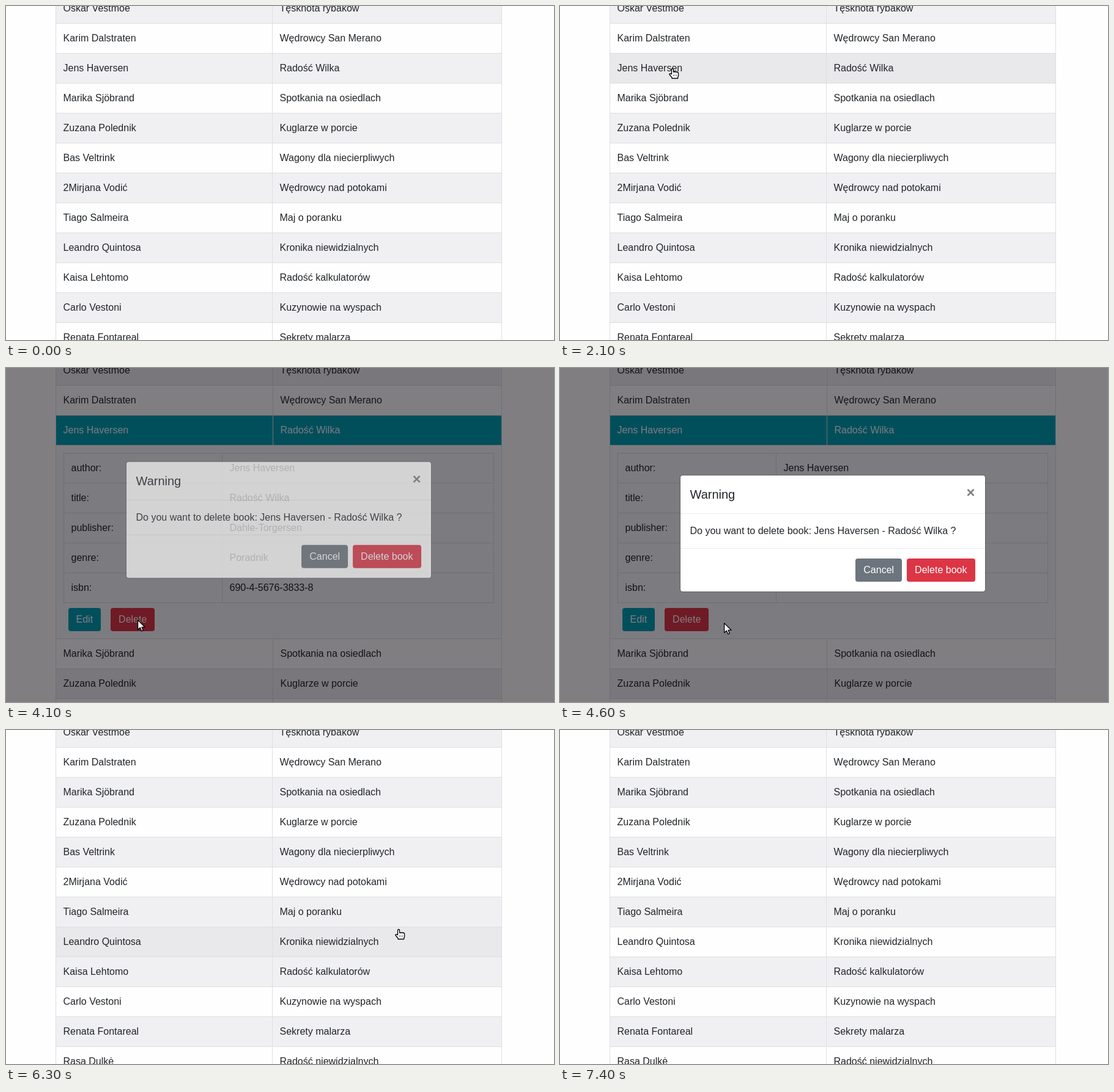
Write an HTML page that moves like this. It is 896 by 547 pixels and loops after 9000 ms.

```html
<!DOCTYPE html>
<html lang="pl">
<head>
<meta charset="utf-8">
<title>Book list</title>
<style>
html, body { margin: 0; width: 100%; height: 100%; overflow: hidden; background: #fefefe; }
body { position: relative; font: 16px/24px "Liberation Sans", Arial, sans-serif; color: #212529; }
div, svg { position: absolute; box-sizing: border-box; white-space: nowrap; }
.layer, #backdrop { inset: 0; overflow: hidden; }
.row { height: 49px; border: solid #dcdfe2; border-width: 0 1px 1px; }
.row div { top: 0; height: 48px; padding: 12px 0 0 11.5px; }
.row div + div { border-left: 1px solid #dcdfe2; }
.odd { background: #f0f0f2; }
.hover { background: #e9e8ea; }
.picked { background: #00a0b4; color: #f8f9fa; }
.detail { left: 81px; top: 127px; width: 730px; height: 317px; background: #f6f7f9; border: solid #dcdfe2; border-width: 0 1px 1px; }
.rule { left: 94px; top: 139px; width: 704px; height: 1px; background: #dcdfe2; }
.buttons { display: flex; }
.btn { position: static; height: 38px; padding: 7px 13px; border-radius: 4px; color: #fff; }
.teal { background: #00a0b4; }
.red { background: #dc3545; }
.red.on { background: #c82333; }
.grey { background: #6c757d; }
#backdrop { background: #050006; }
#modal { left: 195.5px; top: 175px; width: 500px; height: 192px; background: #fff; background-clip: padding-box; border: 1px solid rgba(0,0,0,.2); border-radius: 4.8px; }
#modal .title { left: 16px; top: 16px; font-size: 20px; line-height: 30px; }
#modal .close { right: 16px; top: 16px; font-size: 24px; font-weight: bold; color: #000; opacity: .5; }
#modal .line { left: 0; width: 100%; height: 1px; background: #e9ecef; }
#cursor { left: 0; top: 0; }
svg { left: 0; top: 0; overflow: visible; fill: #fff; stroke: #000; stroke-width: 1.3; stroke-linejoin: round; }
</style>
</head>
<body>
<script>
const LOOP = 9000, STEP = 100, LEFT = 81, WIDTH = 730, PITCH = 49, FIRST = -20;
const books = [
  ["Oskar Vestmoe", "Tęsknota rybaków"],
  ["Karim Dalstraten", "Wędrowcy San Merano"],
  ["Jens Haversen", "Radość Wilka"],
  ["Marika Sjöbrand", "Spotkania na osiedlach"],
  ["Zuzana Polednik", "Kuglarze w porcie"],
  ["Bas Veltrink", "Wagony dla niecierpliwych"],
  ["2Mirjana Vodić", "Wędrowcy nad potokami"],
  ["Tiago Salmeira", "Maj o poranku"],
  ["Leandro Quintosa", "Kronika niewidzialnych"],
  ["Kaisa Lehtomo", "Radość kalkulatorów"],
  ["Carlo Vestoni", "Kuzynowie na wyspach"],
  ["Renata Fontareal", "Sekrety malarza"],
  ["Rasa Dulkė", "Radość niewidzialnych"]
];
const chosen = books[2];

// Each run: start time, then one pointer position per step; the last one holds.
const runs = [
  [1200, [52,159], [79,158], [106,150], [131,138], [153,122], [172,105], [184,96], [184,101]],
  [2100, [183,104]],
  [2700, [190,118], [208,155], [232,212], [254,275], [268,335], [269,380], [258,410], [240,421], [226,424], [232,421]],
  [3700, [215,412]],
  [4200, [222,412], [236,413], [252,415], [263,416], [268,417]],
  [4800, [285,425], [330,442], [420,454], [530,446], [640,416], [699,380], [685,353], [655,338], [641,328]],
  [6500, [630,300], [592,240], [522,172], [430,105], [322,22], [235,36]],
  [7200, [150,28], [75,2], null]
];

function add(parent, cls, text = "", style = {}) {
  const el = document.createElement("div");
  el.className = cls;
  el.textContent = text;
  Object.assign(el.style, style);
  parent.append(el);
  return el;
}
function addRow(parent, [a, b], y, cls = "", x = LEFT, w = WIDTH, mid = 435) {
  const row = add(parent, "row " + cls, "", { left: x + "px", top: y + "px", width: w + "px" });
  add(row, "", a, { left: 0 });
  add(row, "", b, { left: mid - x - 1 + "px" });
  return row;
}
const stripe = i => i % 2 ? "" : "odd";

function plainList(list) {
  const layer = add(document.body, "layer");
  const rows = list.slice(0, 12).map((book, i) => addRow(layer, book, FIRST + i * PITCH, stripe(i)));
  return { layer, rows };
}
function openList() {
  const layer = add(document.body, "layer");
  const main = (i, y, cls) => addRow(layer, books[i], y, cls, LEFT, WIDTH, 436);
  main(0, FIRST, "odd");
  main(1, FIRST + PITCH, "");
  main(2, FIRST + 2 * PITCH, "picked");
  add(layer, "detail");
  add(layer, "rule");
  const fields = [["author:", chosen[0]], ["title:", chosen[1]], ["publisher:", "Dahle-Torgersen"],
    ["genre:", "Poradnik"], ["isbn:", "690-4-5676-3833-8"]];
  fields.forEach((f, i) => addRow(layer, f, 140 + i * PITCH, "", 94, 704, 353));
  const bar = add(layer, "buttons", "", { left: "101.5px", top: "393px", gap: "16px" });
  add(bar, "btn teal", "Edit");
  const del = add(bar, "btn red", "Delete");
  [3, 4, 5].forEach((i, k) => main(i, 444 + k * PITCH, stripe(k + 1)));
  return { layer, rows: [], del };
}

const before = plainList(books);
const open = openList();
const after = plainList(books.filter(b => b !== chosen));
const backdrop = add(document.body, "");
backdrop.id = "backdrop";

const modal = add(document.body, "");
modal.id = "modal";
add(modal, "title", "Warning");
add(modal, "close", "×");
add(modal, "line", "", { top: "62px" });
add(modal, "", `Do you want to delete book: ${chosen[0]} - ${chosen[1]} ?`, { left: "16px", top: "79px" });
add(modal, "line", "", { top: "119px" });
const footer = add(modal, "buttons", "", { right: "16px", top: "136px", gap: "8px" });
add(footer, "btn grey", "Cancel");
const confirmBtn = add(footer, "btn red", "Delete book");

const cursor = add(document.body, "");
cursor.id = "cursor";
cursor.innerHTML = `
  <svg width="13" height="20"><path d="M.6 .9V16.6L4.3 13.2 6.8 18.8 9.3 17.7 6.9 12.3H12Z"/></svg>
  <svg width="17" height="18" style="left:-5px;top:-2px">
    <path d="M4.5 9.6V2a1.5 1.5 0 0 1 3 0V6H13q2.6.2 2.6 2.6V12q0 1.6-1 3v1.5H5V15Q3 13 .8 10q.3-1.9 1.9-1.3Z"/>
    <path fill="none" stroke-dasharray="1 1.5" d="M7 11.5H13"/>
  </svg>`;
const [arrow, hand] = cursor.children;

const clamp = v => Math.max(0, Math.min(1, v));
const inside = (p, x0, y0, x1, y1) => p && p[0] >= x0 && p[0] < x1 && p[1] >= y0 && p[1] < y1;

function pointerAt(t) {
  const run = runs.filter(r => r[0] <= t).pop();
  return run ? run[Math.min(run.length - 1, 1 + Math.floor((t - run[0]) / STEP))] : null;
}
function show(el, on) { el.style.visibility = on ? "visible" : "hidden"; }

function draw(now) {
  const t = Math.floor((now % LOOP) / STEP) * STEP;
  const p = pointerAt(t);
  const list = t < 2200 ? before : t < 6000 ? open : after;
  for (const l of [before, open, after]) l.layer.style.display = l === list ? "" : "none";

  const opening = t < 5000;
  const dim = opening ? clamp((t - 3870) / 150) : 1 - clamp((t - 6085) / 150);
  const fade = opening ? clamp((t - 4000) / 150) : 1 - clamp((t - 5785) / 150);
  const slide = opening ? clamp((t - 4000) / 300) : 1 - clamp((t - 5785) / 300) ** 2;
  backdrop.style.opacity = dim / 2;
  modal.style.opacity = fade;
  modal.style.transform = `translateY(${-50 * (1 - slide) ** 2}px)`;

  const blocked = dim > 0;
  const overTable = !blocked && inside(p, LEFT, 0, LEFT + WIDTH, 547);
  const index = overTable ? Math.floor((p[1] - FIRST) / PITCH) : -1;
  list.rows.forEach((r, i) => r.className = "row " + (i === index ? "hover" : stripe(i)));

  const overDelete = list === open && !blocked && inside(p, 171, 393, 243, 431);
  const overConfirm = fade === 1 && inside(p, 567, 312, 679, 350);
  open.del.classList.toggle("on", overDelete);
  confirmBtn.classList.toggle("on", overConfirm);

  const pointing = overDelete || overConfirm ||
    (overTable && (list !== open || p[1] < 127 || p[1] > 443));
  show(arrow, p && !pointing);
  show(hand, p && pointing);
  if (p) cursor.style.transform = `translate(${p[0]}px, ${p[1]}px)`;
}

const start = performance.now();
function tick() {
  draw(performance.now() - start);
  requestAnimationFrame(tick);
}
tick();
</script>
</body>
</html>
```
